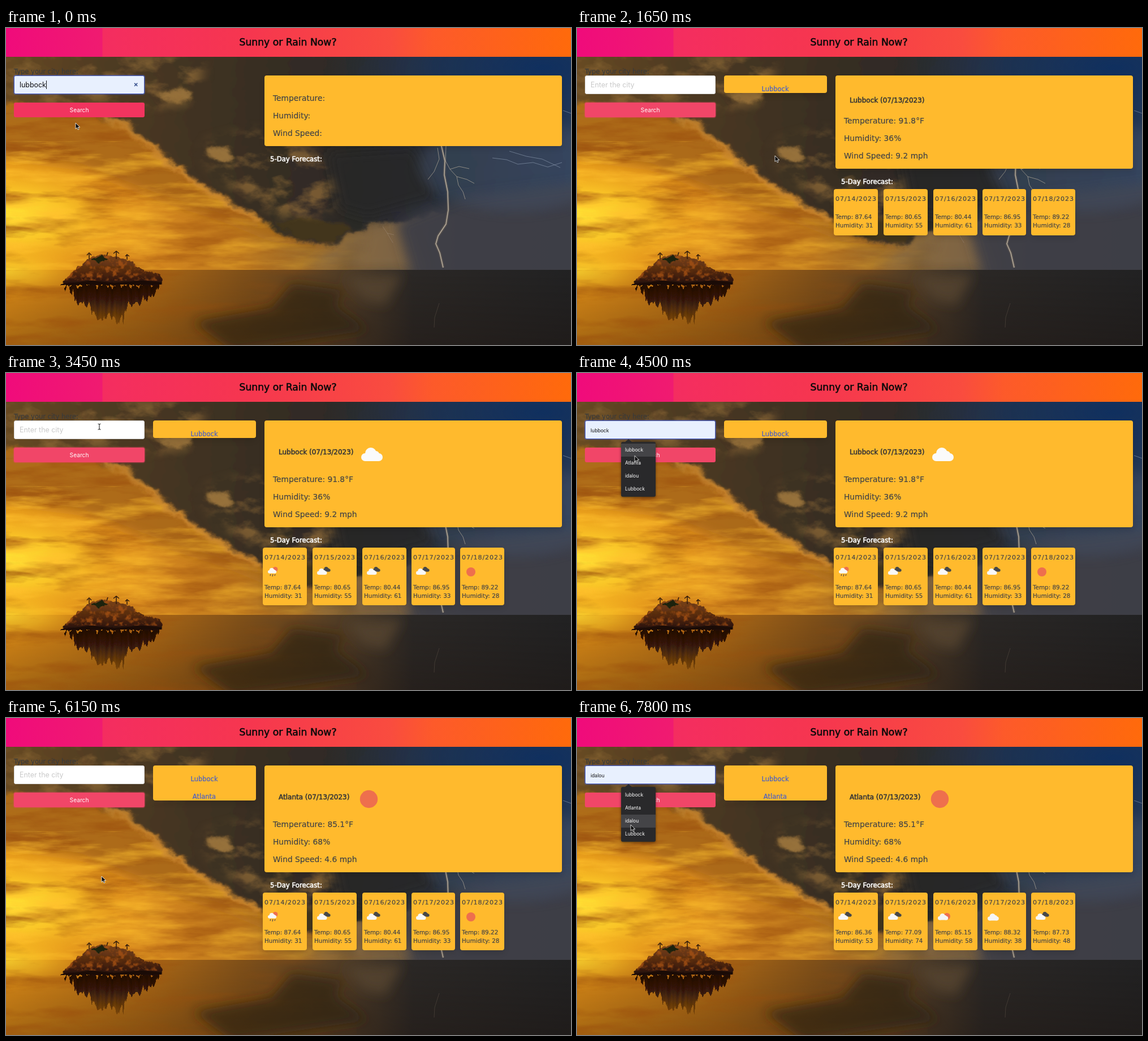
Recreate the animation shown at these times as an HTML page. Size 999 by 561 pixels, loop 8 s.

```html
<!DOCTYPE html>
<html lang="en">
<head>
<meta charset="utf-8">
<title>Weather search</title>
<style>
  html, body { margin: 0; width: 100%; height: 100%; overflow: hidden; background: #2b2520; }
  #stage { position: absolute; left: 0; top: 0; width: 999px; height: 561px; overflow: hidden;
    font-family: "DejaVu Sans", sans-serif; color: #454545; }
  #stage > *, .abs, .text, .box, #lower, .set { position: absolute; }
  #scene { left: 0; top: 0; will-change: transform; }
  .text { line-height: 20px; white-space: pre; -webkit-text-stroke: .2px currentColor; }
  .mid { transform: translateX(-50%); }
  .bold { -webkit-text-stroke-width: .55px; }
  .box { background: #ffba2d; border-radius: 4px; box-shadow: 0 5px 11px -1px rgba(10,10,10,.14), 0 0 1px rgba(10,10,10,.2); }
  #header { left: 0; top: 0; width: 999px; height: 51px;
    background: linear-gradient(90deg, #f00b7b 0, #f01b70 170px, #f42d60 171px, #f6364f 430px, #f94c3f 680px, #fd5a2a 755px, #ff6a0b 999px); }
  #input, #button, #menu { font-family: Inter, sans-serif; box-sizing: border-box; }
  #input { left: 14px; top: 84px; width: 231px; height: 33px; padding-left: 9px; background: #fff;
    border: 1px solid #dbdbdb; border-radius: 3px; font-size: 12.4px; line-height: 32px; color: #111; white-space: pre; }
  #input.filled { background: #e8f0fe; }
  #input.focus { border-color: #485fc7; box-shadow: 0 0 0 1.5px rgba(72,95,199,.3); }
  #input.preview { font-size: 8.6px; line-height: 35px; }
  #hint { color: #c9c9c9; }
  #caret { display: inline-block; width: 1px; height: 15px; margin-right: -1px; background: #111; vertical-align: -3px; }
  #clear { right: 10px; top: -1px; font-weight: 700; color: #3c5591; }
  #button { left: 14px; top: 132px; width: 231px; height: 26px; border-radius: 3px; color: #fff;
    font-size: 10.2px; line-height: 26px; text-align: center; }
  #button.ring { box-shadow: 0 0 0 1.5px rgba(241,70,104,.3); }
  #menu { left: 78px; top: 122px; width: 61px; height: 97px; border-radius: 3px; background: #29292b;
    box-shadow: 0 1px 4px rgba(0,0,0,.5); font-size: 8.5px; line-height: 23px; color: #fff; }
  #menu::before { content: ""; position: absolute; left: 7px; top: -5px; border: 6px solid transparent; border-top: 0; border-bottom: 5px solid #29292b; }
  #menu div { position: absolute; left: 0; width: 54px; padding-left: 7px; }
  #menu .on { background: #444447; }
  .link { color: #485fc7; }
  svg { overflow: visible; }
</style>
</head>
<body>
<div id="stage">
  <svg id="scene" width="999" height="561" viewBox="0 0 999 561">
    <defs>
      <linearGradient id="sky"><stop stop-color="#e79a1c"/><stop offset=".22" stop-color="#d8881d"/><stop offset=".42" stop-color="#c07c20"/><stop offset=".56" stop-color="#93692f"/><stop offset=".68" stop-color="#5d5143"/><stop offset=".82" stop-color="#3f4147"/><stop offset="1" stop-color="#3a3d46"/></linearGradient>
      <linearGradient id="storm"><stop stop-color="#6a4b25"/><stop offset=".2" stop-color="#4d3a20"/><stop offset=".42" stop-color="#3a2f22"/><stop offset=".62" stop-color="#2b2928"/><stop offset=".78" stop-color="#28303d"/><stop offset="1" stop-color="#2c3b57"/></linearGradient>
      <linearGradient id="sea"><stop stop-color="#dd8c18"/><stop offset=".25" stop-color="#ad6916"/><stop offset=".42" stop-color="#805019"/><stop offset=".6" stop-color="#4f3c27"/><stop offset=".72" stop-color="#2b2826"/><stop offset="1" stop-color="#222223"/></linearGradient>
      <linearGradient id="depth" x2="0" y2="1"><stop stop-color="#1a0d06" stop-opacity="0"/><stop offset="1" stop-color="#1a0d06" stop-opacity=".28"/></linearGradient>
      <linearGradient id="rock" x2="0" y2="1"><stop stop-color="#7a4318"/><stop offset=".6" stop-color="#4f260d"/><stop offset="1" stop-color="#1f0d06"/></linearGradient>
      <linearGradient id="mirror" x2="0" y2="1"><stop stop-color="#210d05"/><stop offset=".45" stop-color="#2e1408" stop-opacity=".9"/><stop offset="1" stop-color="#4a230b" stop-opacity=".4"/></linearGradient>
      <linearGradient id="fade"><stop stop-color="#fff"/><stop offset=".6" stop-color="#999"/><stop offset="1" stop-color="#000"/></linearGradient>
      <radialGradient id="glow"><stop stop-color="#ffec38"/><stop offset=".4" stop-color="#ffd02a" stop-opacity=".8"/><stop offset="1" stop-color="#f5a81c" stop-opacity="0"/></radialGradient>
      <radialGradient id="blue"><stop stop-color="#10305f"/><stop offset=".5" stop-color="#1a3358" stop-opacity=".75"/><stop offset="1" stop-color="#2b3950" stop-opacity="0"/></radialGradient>
      <filter id="soft" x="-30%" y="-30%" width="160%" height="160%"><feGaussianBlur stdDeviation="10"/></filter>
      <filter id="rough" x="-20%" y="-20%" width="140%" height="140%">
        <feGaussianBlur stdDeviation="3" result="b"/>
        <feTurbulence type="fractalNoise" baseFrequency=".03 .04" numOctaves="4" seed="8"/>
        <feDisplacementMap in="b" scale="28" xChannelSelector="R" yChannelSelector="G"/>
      </filter>
      <filter id="grain"><feTurbulence type="fractalNoise" baseFrequency=".12" numOctaves="2" result="n"/><feDisplacementMap in="SourceGraphic" in2="n" scale="8" xChannelSelector="R" yChannelSelector="G"/></filter>
      <filter id="ripple"><feTurbulence type="fractalNoise" baseFrequency=".2 .012" numOctaves="2" result="n"/><feDisplacementMap in="SourceGraphic" in2="n" scale="24" xChannelSelector="B" yChannelSelector="G"/></filter>
      <filter id="streaks" x="0" y="0" width="1" height="1" color-interpolation-filters="sRGB">
        <feTurbulence type="fractalNoise" baseFrequency=".007 .04" numOctaves="5" seed="3"/>
        <feColorMatrix values="0 0 0 0 1  0 0 0 0 .76  0 0 0 0 .18  2.6 0 0 0 -1.15"/>
      </filter>
      <filter id="shade" x="0" y="0" width="1" height="1" color-interpolation-filters="sRGB">
        <feTurbulence type="fractalNoise" baseFrequency=".007 .035" numOctaves="5" seed="12"/>
        <feColorMatrix values="0 0 0 0 .6  0 0 0 0 .3  0 0 0 0 .05  2.6 0 0 0 -1.15"/>
      </filter>
      <filter id="billow" x="0" y="0" width="1" height="1" color-interpolation-filters="sRGB">
        <feTurbulence type="fractalNoise" baseFrequency=".016 .026" numOctaves="5" seed="21"/>
        <feColorMatrix values="0 0 0 0 .58  0 0 0 0 .43  0 0 0 0 .22  4 0 0 0 -1.85"/>
      </filter>
      <filter id="texture" x="0" y="0" width="1" height="1" color-interpolation-filters="sRGB">
        <feTurbulence type="fractalNoise" baseFrequency=".09" numOctaves="3" seed="5"/>
        <feColorMatrix values="0 0 0 0 .65  0 0 0 0 .32  0 0 0 0 .08  4 0 0 0 -1.9"/>
      </filter>
      <mask id="fadeMask"><rect y="150" width="650" height="411" fill="url(#fade)"/></mask>
      <mask id="cloudMask"><g fill="#fff" filter="url(#soft)">
        <path d="M-20 50H350L340 130L270 140L180 130L-20 150Z" opacity=".7"/>
        <path d="M350 205L440 180L560 220L590 310L540 340L470 330L400 285L350 235Z" opacity=".7"/>
      </g></mask>
      <path id="island" d="M95 455L110 440L121 427L136 417L148 407L163 401L184 403L206 408L224 415L240 428L270 435L278 446L274 455Z"/>
      <clipPath id="islandClip"><use href="#island"/></clipPath>
      <path id="bolt" d="M769 205L776 235L775 260L781 290L782 322L778 347L764 368L760 382L767 398L770 411L773 424"/>
    </defs>
    <rect width="999" height="561" fill="url(#sky)"/>
    <g filter="url(#soft)">
      <path d="M-30 120H200L460 350L600 385L470 372L380 335L270 300L130 245L-30 225Z" fill="#a5661c" opacity=".85"/>
      <path d="M600 375Q650 345 700 335L740 430H620Q610 400 640 375Q590 395 570 430H530Q560 400 600 375Z" fill="#8a6b43" opacity=".75"/>
    </g>
    <ellipse cx="5" cy="335" rx="250" ry="110" fill="url(#glow)"/>
    <g mask="url(#fadeMask)">
      <rect y="150" width="650" height="290" filter="url(#shade)"/>
      <rect y="200" width="650" height="230" filter="url(#streaks)"/>
    </g>
    <g filter="url(#rough)">
      <path d="M-20 40H1020V330L820 325L680 342L605 360L580 384H545L490 364L445 336L370 294L315 258L260 212L205 172L130 146L-20 132Z" fill="url(#storm)"/>
      <path d="M170 150L220 180L270 224L325 268L380 302L450 341" fill="none" stroke="#d08c32" stroke-width="9" opacity=".85"/>
      <ellipse cx="300" cy="120" rx="28" ry="9" fill="#96713a"/><ellipse cx="378" cy="223" rx="20" ry="12" fill="#96713a"/>
      <path d="M470 340L530 335L610 350L570 383L520 372Z" fill="#43361f"/>
    </g>
    <rect y="51" width="620" height="310" filter="url(#billow)" mask="url(#cloudMask)"/>
    <g filter="url(#soft)">
      <path d="M570 220L720 210L760 300L640 335L590 320Z" fill="#252527" opacity=".8"/>
      <path d="M690 345L800 300L1040 270V450H720Z" fill="#3d4047" opacity=".9"/>
    </g>
    <ellipse cx="950" cy="70" rx="390" ry="150" fill="url(#blue)"/>
    <ellipse cx="900" cy="245" rx="170" ry="80" fill="#46546c" opacity=".4" filter="url(#soft)"/>

    <rect y="428" width="999" height="133" fill="url(#sea)"/>
    <ellipse cx="0" cy="432" rx="160" ry="50" fill="url(#glow)" opacity=".6"/>
    <rect y="428" width="999" height="133" fill="url(#depth)"/>
    <rect y="428" width="620" height="133" filter="url(#shade)" mask="url(#fadeMask)" opacity=".7"/>
    <g filter="url(#soft)">
      <path d="M505 452L600 465L580 490L640 535L400 570L330 520L470 495Z" fill="#2f2414" opacity=".7"/>
      <path d="M600 440L700 436L670 490L630 480Z" fill="#574630" opacity=".8"/>
    </g>
    <g fill="none" stroke="#b8ad9b" stroke-linejoin="round">
      <use href="#bolt" stroke="#8a7a68" stroke-width="5" opacity=".3"/>
      <use href="#bolt" stroke-width="1.5"/>
      <path d="M778 207L777 235L785 250L797 263L800 278L808 290L812 303M763 212L766 232L757 254L746 268M797 263L815 268L828 275M785 250L801 245L819 249" stroke-width=".9" opacity=".75"/>
      <path d="M860 230L885 233L905 241L932 238L958 246L983 238M890 218L920 227L948 232L980 247M985 146L999 151" stroke="#8795ab" opacity=".65"/>
      <path d="M666 351L674 363L684 380M674 363L686 366" stroke="#a08c78" opacity=".5"/>
      <path d="M766 487L758 512L757 530" stroke="#77685b" opacity=".35"/>
    </g>
    <path d="M103 455H272L258 474L236 488L216 488L198 525L184 508L165 518L148 492L126 484Z" fill="url(#mirror)" filter="url(#ripple)"/>
    <use href="#island" fill="url(#rock)" filter="url(#grain)"/>
    <g clip-path="url(#islandClip)">
      <rect x="95" y="400" width="185" height="47" filter="url(#texture)" opacity=".8"/>
    </g>
    <path d="M150 411L168 402L180 409L166 415Z" fill="#1d2410" filter="url(#grain)"/>
    <path d="M96 454H275V450L240 447L190 451L150 447Z" fill="#1a0b06"/>
    <path d="M147 409V400M143 402L147 398L151 402M195 409V396M190 399L195 395L200 399M178 403L180 397M214 410V402M211 404L214 401L218 404" fill="none" stroke="#301a0b" stroke-width="1.5"/>
  </svg>
  <div id="header"></div>
</div>

<script>
const CYCLE = 8000, TICK = 150;
const stage = document.getElementById('stage');
const show = (el, on) => { el.style.display = on ? '' : 'none'; };

function add(parent, cls, style = {}, html = '') {
  const el = document.createElement('div');
  el.className = cls;
  Object.assign(el.style, style);
  el.innerHTML = html;
  parent.append(el);
  return el;
}
const text = (parent, x, y, size, str, cls = '', color = '') =>
  add(parent, 'text ' + cls, { left: x + 'px', top: y - 10 + 'px', fontSize: size + 'px', color }, str);
const box = (parent, x, y, w, h) =>
  add(parent, 'box', { left: x + 'px', top: y + 'px', width: w + 'px', height: h + 'px' });

// Weather icons
const puff = (x, y, k, fill) => `<g transform="translate(${x} ${y}) scale(${k})" fill="${fill}"><circle cx="7" cy="17" r="7"/><circle cx="17" cy="10" r="10"/><circle cx="26" cy="12" r="6"/><circle cx="31" cy="17" r="7"/><path d="M7 12H31V24H7Z"/></g>`;
const disc = (x, y, r) => `<circle cx="${x}" cy="${y}" r="${r}" fill="#ee6f4d"/>`;
const icons = {
  sun: disc(11, 10, 8),
  cloud: puff(1, 4, .52, '#f6f6f6'),
  broken: puff(10, 1, .36, '#484848') + puff(0, 4, .46, '#f8f8f8'),
  partly: disc(16, 9, 6) + puff(0, 4, .48, '#f6f6f6'),
  rain: disc(14, 5.5, 4.5) + puff(1, 3, .4, '#f8f8f8') + '<path d="M6 14l-1 3M10 14l-1 4M14 14l-1 3" stroke="#5b4a4a" stroke-width="1.2"/>'
};
const icon = (parent, x, y, art) => add(parent, 'abs', { left: x + 'px', top: y + 'px', lineHeight: 0 }, `<svg width="28" height="20">${art}</svg>`);

text(stage, 498.5, 24.5, 17.2, 'Sunny or Rain Now?', 'mid bold', '#0a0a0a');
text(stage, 14, 76.5, 11.5, 'Type your city here:', '', '#3b3b3b');

const input = add(stage, '');
input.id = 'input';
input.innerHTML = '<span id="value"></span><span id="caret"></span><span id="hint">Enter the city</span><span id="clear" class="abs">×</span>';
const [value, caret, hint, clear] = input.children;
const button = add(stage, '', {}, 'Search');
button.id = 'button';

// Search history
const recent = add(stage, '', { left: 0, top: 0 });
const recentBox = box(recent, 260, 84, 182, 31);
text(recent, 350.5, 107.5, 11.5, 'Lubbock', 'mid link');
const second = text(recent, 350.5, 138.5, 11.5, 'Atlanta', 'mid link');

// Current conditions
const mainBox = box(stage, 457, 84, 526, 125);
const cities = [
  { name: 'Lubbock', now: ['91.8°F', '36%', '9.2 mph'], art: puff(628, 128, 1, '#fafafa') },
  { name: 'Atlanta', now: ['85.1°F', '68%', '4.6 mph'], art: disc(641.5, 139.5, 15.7) }
];
for (const city of cities) {
  city.title = text(stage, 482, 139.5, 12, `${city.name} (07/13/2023)`, 'bold', '#363636');
  city.picture = add(stage, '', { left: 0, top: 0, lineHeight: 0 }, `<svg width="1" height="1">${city.art}</svg>`);
}
const lower = add(stage, '', { left: 0, top: 0 });
const readings = ['Temperature', 'Humidity', 'Wind Speed'].map((label, i) => {
  const el = text(lower, 472, 123.5 + 31.2 * i, 13.8, '');
  return city => { el.textContent = `${label}: ${city ? city.now[i] : ''}`; };
});
text(lower, 467, 232, 11.7, '5-Day Forecast:', 'bold', '#fff');

const cardEdges = [[454, 78], [542, 78], [630, 77.5], [717, 76.5], [803, 78]];
function forecast(days) {
  const set = add(lower, 'set', { left: 0, top: 0 });
  const parts = days.map(([art, temp, humidity], i) => {
    const [x, w] = cardEdges[i];
    const card = box(set, x, 245, w, 102);
    text(set, x + 3, 263, 11, `07/${14 + i}/2023`).style.letterSpacing = '.95px';
    const picture = icon(set, x + 8, 278, icons[art]);
    const lines = add(set, 'abs', { left: 0, top: 0 });
    text(lines, x + 3, 315, 10.4, 'Temp: ' + temp);
    text(lines, x + 3, 330, 10.4, 'Humidity: ' + humidity);
    return { card, picture, lines };
  });
  return (visible, loaded) => {
    show(set, visible);
    for (const { card, picture, lines } of parts) {
      card.style.height = (loaded ? 102 : 82) + 'px';
      show(picture, loaded);
      lines.style.top = loaded ? 0 : '-21px';
    }
  };
}
const forecasts = [
  forecast([['rain', '87.64', 31], ['broken', '80.65', 55], ['broken', '80.44', 61], ['broken', '86.95', 33], ['sun', '89.22', 28]]),
  forecast([['broken', '86.36', 53], ['broken', '77.09', 74], ['partly', '85.15', 58], ['cloud', '88.32', 38], ['broken', '87.73', 48]])
];

// Autofill menu
const suggestions = ['lubbock', 'Atlanta', 'idalou', 'Lubbock'];
const menu = add(stage, '');
menu.id = 'menu';
const rows = suggestions.map((name, i) => add(menu, '', { top: 3 + 23 * i + 'px' }, name));

// Pointer
const shapes = {
  arrow: '<path d="M0 0V10.5L2.5 8.3L4.2 12L6 11.2L4.4 7.6H7.8Z" fill="#080808" stroke="#fff" stroke-width=".8"/>',
  hand: '<path d="M-2 -4.5Q-1 -5.5 -.2 -4.5V-1L3.8 0Q5 .4 4.6 2.2L3.8 6H-1.5L-4.5 1.2Q-4 -.2 -2 1.5Z" fill="#fff" stroke="#111" stroke-width=".9"/><path d="M.3 2V4.5M2.3 2V4.5" stroke="#111" stroke-width=".7"/>',
  beam: '<path d="M-2.5 -5Q0 -5 0 -3.5Q0 -5 2.5 -5M0 -4V4M-2.5 5Q0 5 0 3.5Q0 5 2.5 5" fill="none" stroke="#222" stroke-width="1.1"/>'
};
const pointer = add(stage, '', { left: 0, top: 0, lineHeight: 0 });
const sprites = Object.fromEntries(Object.entries(shapes).map(([name, art]) =>
  [name, add(pointer, 'abs', {}, `<svg width="1" height="1">${art}</svg>`)]));

const route = [
  [0, 123, 164], [450, 127, 148], [750, 127, 148], [1050, 387, 278], [1500, 405, 290],
  [1650, 350, 222], [1950, 236, 133], [2100, 250, 182], [2700, 428, 355], [2850, 428, 355],
  [3450, 165, 91], [3600, 112, 101], [3750, 112, 101], [4800, 98, 159], [4950, 98, 159],
  [5550, 140, 152], [5700, 140, 152], [6150, 169, 276], [6900, 90, 103], [7050, 90, 103], [7800, 95, 185]
];
function locate(t) {
  const i = Math.max(1, route.findIndex(p => p[0] >= t));
  const [a, b] = [route[i - 1], route[i]];
  const k = (t - a[0]) / (b[0] - a[0]);
  return [a[1] + (b[1] - a[1]) * k, a[2] + (b[2] - a[2]) * k];
}

function render(t) {
  const within = (from, to) => t >= from && t < to;
  const [x, y] = locate(t);
  const menuOpen = within(3900, 4950) || t >= 7200;
  const row = menuOpen && y >= 125 ? Math.floor((y - 125) / 23) : -1;
  const preview = suggestions[row];
  const typed = t < 900 ? 'lubbock' : within(4950, 5850) ? 'Atlanta' : '';
  const focused = t < 750 || within(3600, 5700) || t >= 7050;
  const overButton = !menuOpen && x > 14 && x < 245 && y > 131 && y < 158;
  const overInput = x > 14 && x < 245 && y > 84 && y < 117;

  value.textContent = preview || typed;
  show(hint, !preview && !typed);
  show(caret, t < 300 || within(3600, 3900));
  show(clear, focused && typed);
  input.className = [focused && 'focus', (preview || typed) && 'filled', preview && 'preview'].filter(Boolean).join(' ');

  button.style.background = within(5400, 5850) ? '#ef2e55' : overButton || t < 750 ? '#f2345f' : '#f14668';
  button.className = within(900, 3600) || within(5850, 7050) ? 'ring' : '';
  show(menu, menuOpen);
  rows.forEach((el, i) => { el.className = i === row ? 'on' : ''; });

  const current = t >= 5850 ? 1 : t >= 1650 ? 0 : -1;
  const iconLoaded = within(1800, 5850) || t >= 6000;
  const shift = current < 0 ? 0 : iconLoaded ? 64 : 40;
  mainBox.style.height = 125 + shift + 'px';
  lower.style.transform = `translateY(${shift}px)`;
  cities.forEach((city, i) => {
    show(city.title, i === current);
    city.title.style.top = (iconLoaded ? 129.5 : 118) + 'px';
    show(city.picture, i === current && iconLoaded);
  });
  readings.forEach(update => update(cities[current]));
  forecasts[0](within(1650, 6300), t >= 2100);
  forecasts[1](t >= 6300, t >= 6450);
  show(recent, current >= 0);
  show(second, current === 1);
  recentBox.style.height = (current === 1 ? 62 : 31) + 'px';

  pointer.style.transform = `translate(${x}px, ${y}px)`;
  const kind = overButton ? 'hand' : overInput ? 'beam' : 'arrow';
  for (const name in sprites) show(sprites[name], name === kind);
}

const start = performance.now();
let last = -1;
function frame() {
  const time = (performance.now() - start) % CYCLE;
  const t = Math.min(7800, Math.floor(time / TICK) * TICK);
  if (t !== last) render(last = t);
  requestAnimationFrame(frame);
}
frame();
</script>
</body>
</html>
```
